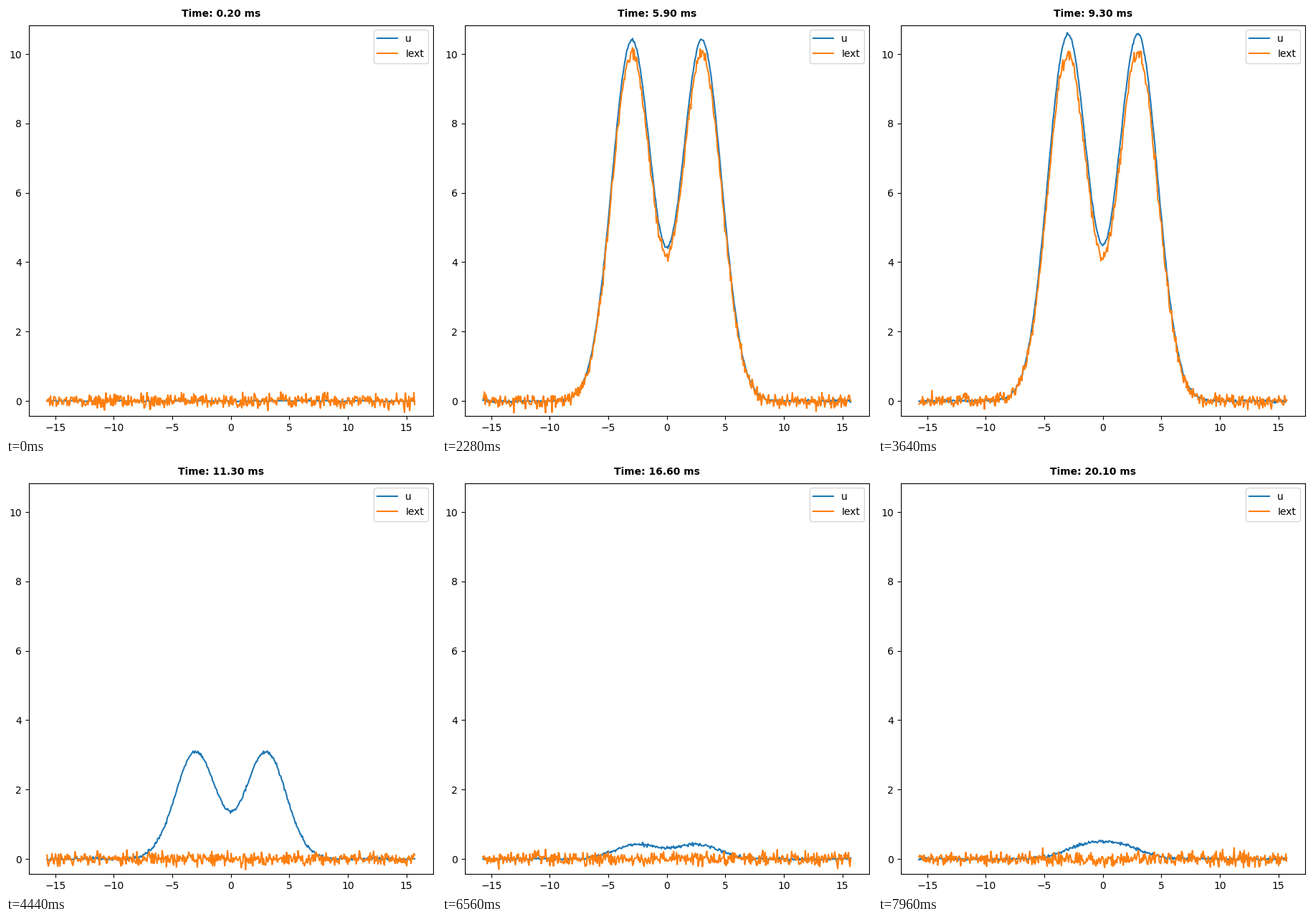
Animation of 600x600 px, one loop 8000 ms. Source, as a matplotlib script:

```python
import numpy as np
import matplotlib.pyplot as plt
from matplotlib.animation import FuncAnimation

SIZE, DPI = 600, 100
FRAMES, INTERVAL = 200, 40
POINTS = 512
STEP = 0.1                      # simulated ms per step
ON, OFF = 20, 100               # stimulus window, in steps
STIM_AMP, STIM_WIDTH = 10, 1.2
REC_AMP, REC_END, REC_SD = 0.56, 0.35, 1.87
NOISE = 0.1

plt.rcParams.update({"font.family": "DejaVu Sans", "font.size": 10})

x = np.linspace(-5 * np.pi, 5 * np.pi, POINTS)


def twin_bumps(centre, sd):
    return sum(np.exp(-0.5 * ((x - c) / sd) ** 2) for c in (-centre, centre))


stimulus = STIM_AMP * twin_bumps(3, np.sqrt(2) * STIM_WIDTH)

rng = np.random.default_rng(11)
noise = rng.normal(0, NOISE, (FRAMES + 2, POINTS))
leak = np.zeros_like(noise)     # noise after leaky integration
for n in range(1, len(noise)):
    leak[n] = leak[n - 1] + STEP * (noise[n] - leak[n - 1])


def external(step):
    on = ON < step <= OFF
    return noise[step - 1] + (stimulus if on else 0)


def charge(step):
    """Fraction of the stimulus that the leaky field has taken up."""
    rise = 1 - (1 - STEP) ** np.clip(step - ON, 0, OFF - ON)
    return rise * (1 - STEP) ** max(step - OFF, 0)


def recurrent(step):
    """Self-sustained bumps, which drift together once the input stops."""
    if step <= OFF:
        return REC_AMP * charge(step) * twin_bumps(3, REC_SD)
    q = (step - OFF) / (FRAMES + 1 - OFF)
    ease = (1 - np.cos(np.pi * q)) / 2
    height = REC_AMP + (REC_END - REC_AMP) * ease
    return height * twin_bumps(3 - 1.5 * q ** 3.1, REC_SD)


def field(step):
    return charge(step) * stimulus + recurrent(step) + leak[step - 1]


fig, ax = plt.subplots(figsize=(SIZE / DPI, SIZE / DPI), dpi=DPI,
                       facecolor="white", layout="constrained")
ax.set_xlim(-5.5 * np.pi, 5.5 * np.pi)
ax.set_ylim(-0.434, 10.838)
ax.set_xticks(range(-15, 16, 5))
ax.set_yticks(range(0, 11, 2))

u_line, = ax.plot(x, field(2), color="C0", label="u")
ext_line, = ax.plot(x, external(2), color="C1", label="Iext")
ax.legend(loc="upper right")
title = fig.suptitle("Time: 0.20 ms", fontsize=10, weight="bold")


def draw(i):
    step = i + 2
    u_line.set_ydata(field(step))
    ext_line.set_ydata(external(step))
    title.set_text(f"Time: {step * STEP:.2f} ms")
    return u_line, ext_line, title


anim = FuncAnimation(fig, draw, frames=FRAMES, interval=INTERVAL,
                     repeat=True, repeat_delay=0, blit=False)
plt.show()
```
